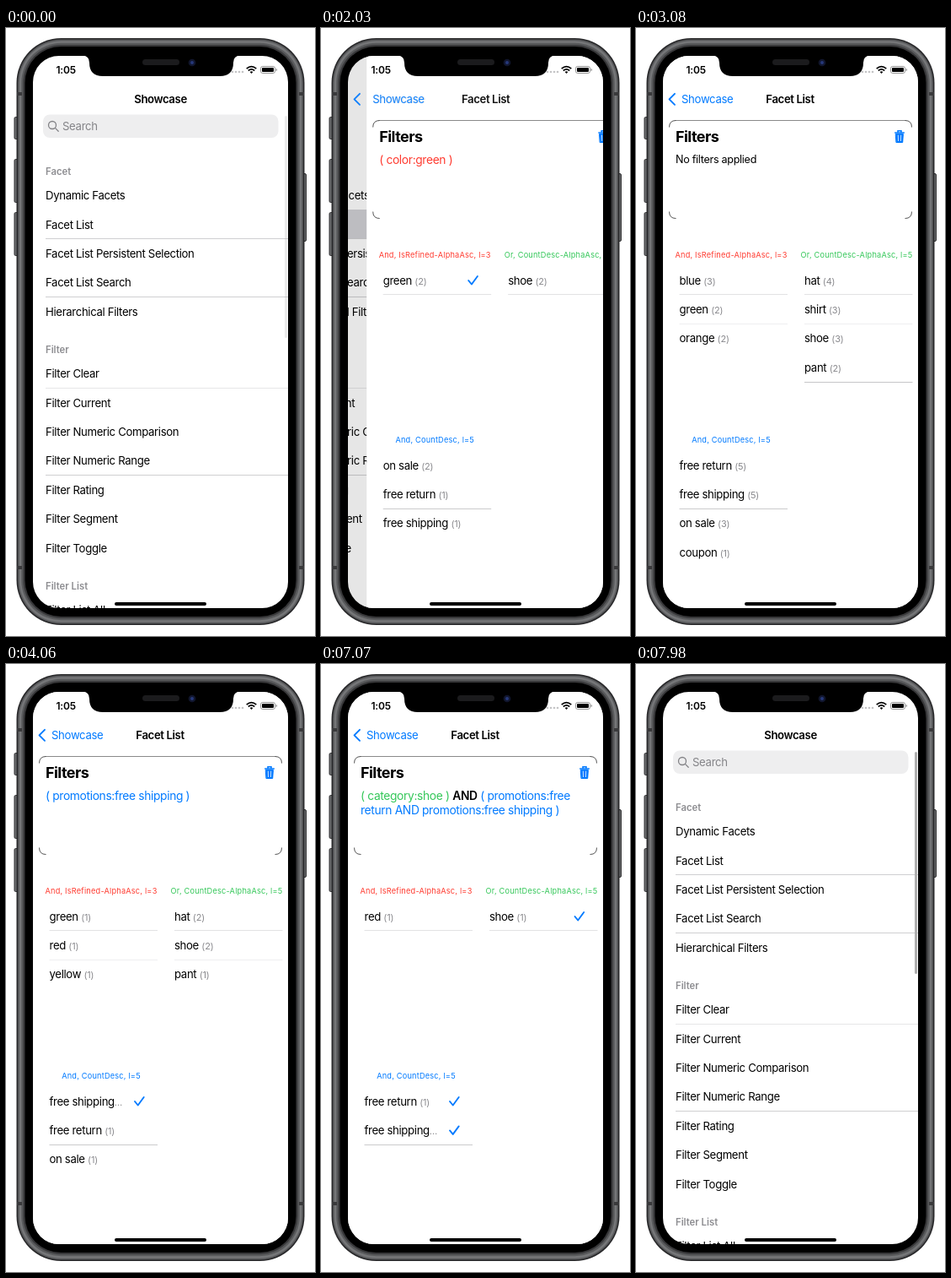
An HTML page for the animation above (8 s loop, 367 by 720 pixels).

```html
<!DOCTYPE html>
<html lang="en">
<head>
<meta charset="utf-8">
<title>Facet list demo</title>
<style>
html, body { margin: 0; width: 100%; height: 100%; overflow: hidden; background: #fff; }
svg { display: block; width: 367px; height: 720px; }
text { font-family: Inter, "Liberation Sans", sans-serif; font-size: 13.2px; letter-spacing: -.35px; fill: #000; }
.title { font-weight: 600; letter-spacing: -.4px; text-anchor: middle; }
.section { font-weight: 600; font-size: 11.3px; letter-spacing: 0; fill: #8c8c90; }
.big { font-weight: 700; font-size: 18px; letter-spacing: -.55px; }
.query { font-size: 13.8px; }
.none { font-size: 12.6px; letter-spacing: -.3px; }
.label { font-size: 9.2px; letter-spacing: .2px; text-anchor: middle; }
.count { font-size: 11px; letter-spacing: -.2px; fill: #8a8a8e; }
.and { font-weight: 600; fill: #000; }
.red { fill: #ff3b30; }
.green { fill: #34c759; }
.blue { fill: #007aff; }
.line { fill: none; stroke: #007aff; stroke-width: 1.9; stroke-linecap: round; stroke-linejoin: round; }
.clock { font-weight: 600; font-size: 12px; letter-spacing: -.2px; }
</style>
</head>
<body>
<svg id="stage" viewBox="0 0 367 720">
  <defs>
    <clipPath id="screen"><rect x="32" y="33" width="303" height="654" rx="31"/></clipPath>
  </defs>

  <g fill="#6f7072" stroke="#2a2a2c" stroke-width="1">
    <rect x="10" y="105.5" width="6" height="26" rx="1.5"/>
    <rect x="10" y="155.5" width="6" height="51" rx="1.5"/>
    <rect x="10" y="218.5" width="6" height="51" rx="1.5"/>
    <rect x="350.5" y="172.5" width="6" height="80" rx="1.5"/>
  </g>
  <g id="frame"></g>
  <path d="M13 78h6M348 78h6M13 639h6M348 639h6" stroke="#3a3a3c" stroke-width="4"/>

  <g clip-path="url(#screen)">
    <rect x="32" y="33" width="304" height="655" fill="#fff"/>
    <g id="list">
      <rect id="picked" x="32" y="215" width="304" height="34.5" fill="#d1d1d6"/>
      <g id="rows"></g>
    </g>
    <g id="search">
      <rect x="44" y="102.5" width="279.5" height="27.5" rx="8" fill="#eeeeef"/>
      <g fill="none" stroke="#828286" stroke-width="1.3" stroke-linecap="round">
        <circle cx="55" cy="115" r="4.5"/><path d="M58.4 118.4l3.8 3.8"/>
      </g>
      <text id="hint" x="67" y="121" style="fill:#848488">Search</text>
    </g>
    <rect id="dim" x="32" y="33" width="304" height="655"/>
    <g id="detail">
      <rect x="32" y="33" width="304" height="655" fill="#fff"/>
      <g fill="none" stroke-width="1">
        <path d="M46 109.5H321" stroke="#8a8a8a"/>
        <path d="M39.5 117.5q0-8 8-8M319.5 109.5q8 0 8 8M39.5 217.5q0 8 8 8M319.5 225.5q8 0 8-8" stroke="#555"/>
        <path id="sides" d="M39.5 117V218" stroke="#777"/>
      </g>
      <text class="big" x="47" y="135">Filters</text>
      <g fill="none" stroke="#007aff" stroke-width="1.5" stroke-linecap="round">
        <path d="M307.7 124H318.3M311 123.4v-1.6h4v1.6"/>
        <path d="M308.6 125.5h8.8l-.7 10h-7.4z" fill="#007aff" stroke-width="1"/>
        <path d="M311.3 127l.2 6.6M314.7 127l-.2 6.6" stroke="#fff" stroke-width=".8"/>
      </g>
      <text class="label red" x="113" y="272">And, IsRefined-AlphaAsc, l=3</text>
      <text class="label green" x="262" y="272">Or, CountDesc-AlphaAsc, l=5</text>
      <text class="label blue" x="113" y="491">And, CountDesc, l=5</text>
      <rect id="press" x="39" y="535" width="141" height="33.5" fill="#d1d1d6"/>
      <g id="states"></g>
    </g>
    <text id="listTitle" class="title" x="183.5" y="89">Showcase</text>
    <text id="detailTitle" class="title" x="183" y="89">Facet List</text>
    <text id="back" class="blue" x="54" y="89">Showcase</text>
    <path id="chevron" class="line" d="M46 77.8l-6.5 6.5 6.5 6.5"/>
    <rect id="bar" x="331" y="104" width="3" height="263" rx="1.5" fill="#adadad"/>

    <text class="clock" x="59.5" y="53.5">1:05</text>
    <g fill="#c4c4c6">
      <circle cx="269" cy="52" r="1.3"/><circle cx="273" cy="52" r="1.3"/>
      <circle cx="277" cy="52" r="1.3"/><circle cx="281" cy="52" r="1.3"/>
    </g>
    <g fill="none" stroke="#000" stroke-width="1.7">
      <path d="M285.7 48.2q5.8-5.2 11.6 0M287.8 50.5q3.7-3.3 7.4 0"/>
      <path d="M289.6 52l1.9 1.9 1.9-1.9q-1.9-1.5-3.8 0z" fill="#000" stroke="none"/>
    </g>
    <rect x="302.5" y="45.5" width="17" height="8" rx="2.3" fill="none" stroke="#8a8a8a" stroke-width=".9"/>
    <rect x="304" y="47" width="14" height="5" rx="1.1"/>
    <path d="M320.7 48v3q1.3-.4 1.3-1.5t-1.3-1.5z" fill="#8a8a8a"/>
    <rect x="129" y="680" width="109" height="4" rx="2"/>
  </g>

  <path d="M91 32.5q8 .5 8 8.5 0 16 16 16H254q16 0 16-16 0-8 8-8.5z"/>
  <rect x="162" y="37" width="44" height="7" rx="3.5" fill="#1b1b1d"/>
  <circle cx="221" cy="41" r="4.3" fill="#11162e"/>
  <circle cx="221" cy="41" r="2" fill="#26387a"/>
</svg>

<script>
const $ = id => document.getElementById(id);
const text = (x, y, body, cls = "") => `<text x="${x}" y="${y}" class="${cls}">${body}</text>`;
const rule = (x1, x2, y, color) => `<path d="M${x1} ${y}H${x2}" stroke="${color}"/>`;
const span = (cls, body) => `<tspan class="${cls}">${body}</tspan>`;

// Phone body: nested rounded bands, from the metal edge in to the black glass
const band = (inset, color) => `<rect x="${12.5 + inset}" y="${12 + inset}" width="${342 - 2 * inset}"
  height="${695 - 2 * inset}" rx="${53 - inset}" fill="${color}"/>`;
$("frame").innerHTML = band(0, "#262628") + band(1.6, "#58595b") + band(3.2, "#757678") +
  band(5.8, "#58595b") + band(8, "#38383a") + band(10, "#000");

// Menu page
const section = (name, y, rows) => text(47, y + 4, name, "section") +
  rows.map((r, i) => text(47, y + 33.2 + i * 34.4, r)).join("");

$("rows").innerHTML =
  section("Facet", 170, ["Dynamic Facets", "Facet List", "Facet List Persistent Selection",
    "Facet List Search", "Hierarchical Filters"]) +
  section("Filter", 381, ["Filter Clear", "Filter Current", "Filter Numeric Comparison",
    "Filter Numeric Range", "Filter Rating", "Filter Segment", "Filter Toggle"]) +
  section("Filter List", 661, ["Filter List All"]) +
  [249.5, 318.5, 529.5].map(y => rule(47, 335, y, "#cfcfd1")).join("") +
  rule(47, 335, 426.5, "#e6e6e8");

// Facet page: each row is "name|count", a leading * marks it as checked
const upper = ["#e2e2e4", "#eeeef0", "", "#c6c6c8"];
const lower = ["", "#cbcbcd"];

function column(x, y, rows, rules) {
  return rows.map((row, i) => {
    const on = row[0] === "*";
    const [name, n] = row.slice(on ? 1 : 0).split("|");
    const mid = y + i * 34.4;
    const tail = n ? " " + span("count", `(${n})`) : span("count", "…");
    return text(x, mid + 4.6, name + tail) +
      (on ? `<path class="line" d="M${x + 101.5} ${mid}l3.7 4.5 7-9.5"/>` : "") +
      (rules[i] ? rule(x, x + 128.5, Math.floor(mid + 16.8) + .5, rules[i]) : "");
  }).join("");
}

const query = (...lines) => lines.map((l, i) => text(47, 161.4 + i * 17, l, "query")).join("");

const states = [
  { at: 0, head: query(span("red", "( color:green )")),
    color: ["*green|2"], kind: ["shoe|2"],
    promo: ["on sale|2", "free return|1", "free shipping|1"] },
  { at: 3080, head: text(47, 160.4, "No filters applied", "none"),
    color: ["blue|3", "green|2", "orange|2"],
    kind: ["hat|4", "shirt|3", "shoe|3", "pant|2"],
    promo: ["free return|5", "free shipping|5", "on sale|3", "coupon|1"] },
  { at: 4060, head: query(span("blue", "( promotions:free shipping )")),
    color: ["green|1", "red|1", "yellow|1"],
    kind: ["hat|2", "shoe|2", "pant|1"],
    promo: ["*free shipping", "free return|1", "on sale|1"] },
  { at: 5180, head: query(span("blue", "( promotions:free return AND"), span("blue", "promotions:free shipping )")),
    color: ["red|1"], kind: ["shoe|1"],
    promo: ["*free return|1", "*free shipping"] },
  { at: 6020, head: query(span("green", "( category:shoe )") + " " + span("and", "AND") + " " +
      span("blue", "( promotions:free"), span("blue", "return AND promotions:free shipping )")),
    color: ["red|1"], kind: ["*shoe|1"],
    promo: ["*free return|1", "*free shipping"] }
];

$("states").innerHTML = states.map(s => "<g>" + s.head +
  column(51.5, 299, s.color, upper) +
  column(200, 299, s.kind, upper) +
  column(51.5, 518, s.promo, lower) + "</g>").join("");
const stateNodes = [...$("states").children];

// Critically damped spring, 0 to 1
function spring(ms) {
  if (ms <= 0) return 0;
  if (ms > 520) return 1;
  const k = 18.26 * ms / 1000;
  return 1 - (1 + k) * Math.exp(-k);
}

const LOOP = 8000, STEP = 70, WIDTH = 302, PUSH = 1796, POP = 7085;
const shift = (id, x) => $(id).setAttribute("transform", `translate(${x.toFixed(2)} 0)`);
const fade = (id, a) => $(id).setAttribute("opacity", Math.max(0, Math.min(1, a)).toFixed(3));

function draw(now) {
  const t = Math.floor(now % LOOP / STEP) * STEP;
  const popping = t >= POP;
  // share of the facet page that is on screen; the bar trails slightly on the way back
  const page = popping ? 1 - spring(t - POP) : spring(t - PUSH);
  const nav = popping ? 1 - spring(t - POP - 16) : page;

  shift("list", -.3 * WIDTH * page);
  shift("search", -WIDTH * nav);
  shift("detail", WIDTH * (1 - page));
  shift("listTitle", -98 * nav);
  shift("back", 98 * (1 - nav));
  shift("detailTitle", 172 * (1 - nav));
  fade("dim", .115 * page * page);
  fade("detail", page > 0 ? 1 : 0);
  fade("listTitle", 1 - nav);
  for (const id of ["back", "detailTitle", "chevron"]) fade(id, nav);
  fade("search", popping ? 1 : 1 - nav * 1.1);
  fade("hint", popping ? (t - POP) / 400 : 1);
  fade("picked", popping ? 1 - (t - POP) / 300 : t >= PUSH ? 1 : 0);
  fade("sides", popping ? 1 : 0);
  fade("press", (t >= 3780 && t < 4060) || (t >= 5040 && t < 5180) ? 1 : 0);
  fade("bar", t < 630 ? .25 : t >= 7980 ? 1 : t >= 7910 ? .5 : 0);

  const current = states.filter(s => s.at <= t).length - 1;
  stateNodes.forEach((g, i) => g.style.display = i === current ? "" : "none");
}

let start;
function tick(now) {
  start ??= now;
  draw(now - start);
  requestAnimationFrame(tick);
}
draw(0);
requestAnimationFrame(tick);
</script>
</body>
</html>
```
